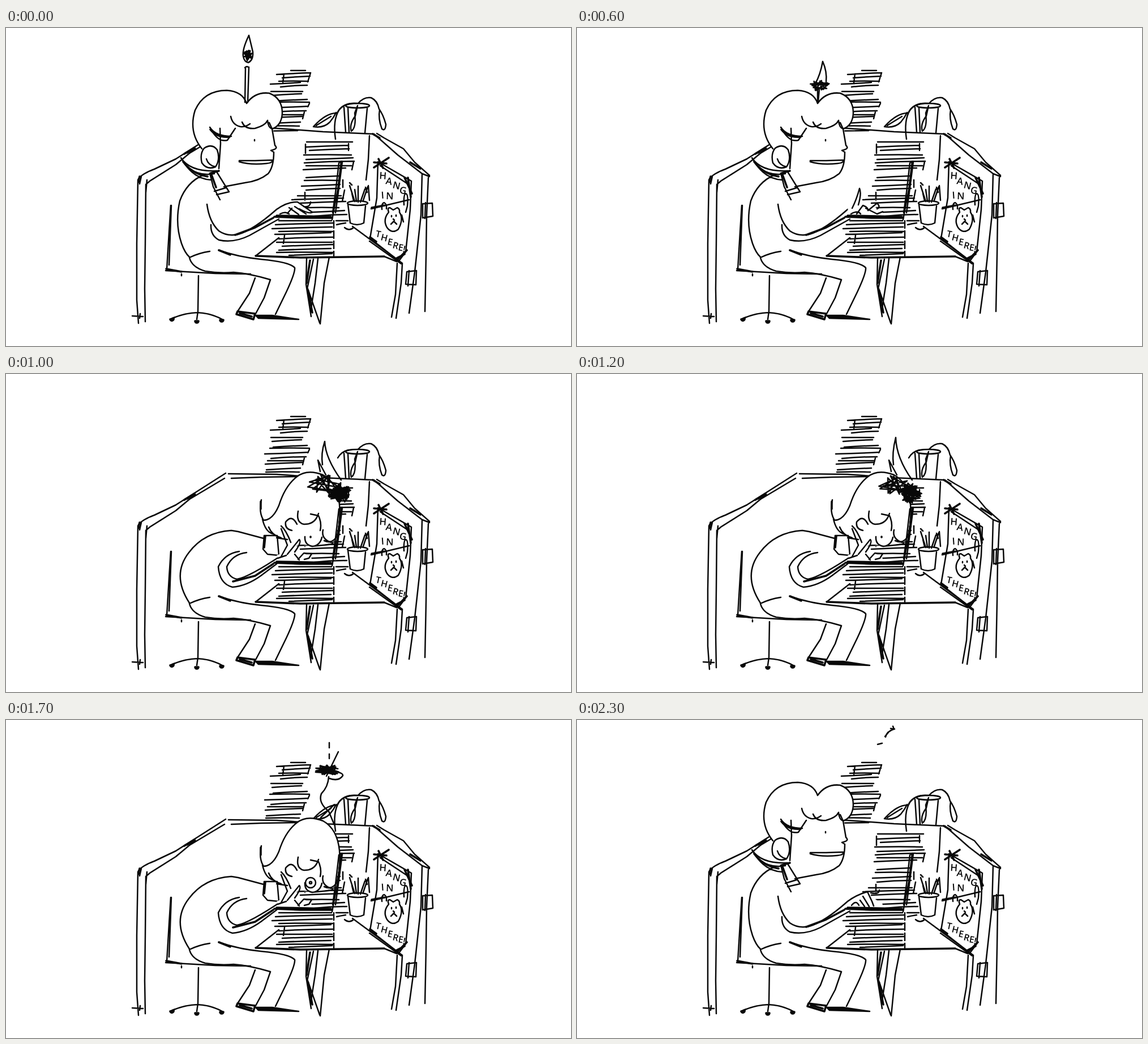
Animation of 998x561 px, one loop 2.4 s. Source, as an HTML page:

```html
<!DOCTYPE html>
<html lang="en">
<head>
<meta charset="utf-8">
<title>Burnout at the desk</title>
<style>
html, body { margin: 0; width: 100%; height: 100%; overflow: hidden; background: #fff; }
svg { display: block; width: 100vw; height: 100vh; }
path, ellipse { fill: none; stroke: #080808; stroke-width: 2.5; stroke-linecap: round; stroke-linejoin: round; }
.bold { stroke-width: 3.6; }
.ink { fill: #080808; }
.cover { fill: #fff; stroke: none; }
text { font-family: "Open Sans", "Noto Sans", sans-serif; font-weight: 600; fill: #080808; }
</style>
</head>
<body>
<svg viewBox="0 0 998 561" preserveAspectRatio="none">
  <!-- cubicle walls -->
  <path d="M234 521L231 480 231 380 233 268Q236 259 262 249L300 231 333 210 388 175M246 518L245 460 246 380 247 276 254 270 300 241 324 221 386 184M239 262L236 275M249 268L247 290M223 508L242 509M237 504L236 512"/>
  <path class="bold" d="M315 222L333 211M320 220L334 213M236 262L234 272"/>
  <path d="M393 176L478 177 520 180 560 183 650 187M398 184L450 182 515 181M650 187L692 224 735 257M655 186L668 194 702 213 722 237 748 260M748 262L735 257 733 330 722 430 712 503M746 264L743 330 742 400 740 500M642 190L640 232 636 268"/>
  <path class="bold" d="M648 187L660 194M714 237L732 248"/>
  <path d="M736 310L753 309 754 332 736 335ZM741 308L740 336M708 430L725 428 724 453 706 452ZM712 428L710 455"/>

  <!-- paper piles -->
  <path id="topPile"/>
  <path id="midPile"/>

  <!-- plant -->
  <path id="stem" d="M620 133Q599 131 588 145Q577 163 582 196M584 150Q565 150 543 174Q561 177 572 166Q579 158 583 149M548 172L574 156"/>
  <path d="M597 140L600 184M604 141L606 184M638 142L634 185M621 137L617 155Q606 170 610 182Q619 176 616 150L621 137M622 133Q632 121 645 123Q656 128 659 143Q666 152 671 170Q670 183 664 178Q657 160 660 144M586 148Q592 137 605 134"/>
  <ellipse cx="621" cy="137" rx="21" ry="4"/>

  <!-- poster -->
  <path d="M657 236L655 300 643 371 694 411 706 395 714 320 716 270 657 236M661 243L711 276M642 376L698 416M645 319L712 303"/>
  <path class="bold" d="M650 246L676 229M658 231L666 247M650 237L672 239M704 264L717 292M710 264L715 298M643 369L654 377M691 409L708 392M690 406L704 399M646 317L668 313"/>
  <path d="M664 320Q663 309 668 308Q673 311 672 319M703 312Q702 294 706 292Q711 293 709 314L706 325M676 325Q673 317 678 317L684 321 691 317Q696 319 695 325Q703 337 693 355Q682 364 673 352Q665 338 676 325M681 331V333M689 330V332M684 337L686 339M680 346L685 341 690 346M699 330L702 342"/>
  <text font-size="17" x="659 670 682 694" y="266 275 282 291" rotate="4 10 14 12">HANG</text>
  <text font-size="17" x="663 671" y="301 302" rotate="-4 2">IN</text>
  <text font-size="16" x="652 661 673 682 692 700" y="368 374 382 388 392 395" rotate="12 14 12 14 10 12">THERE!</text>

  <!-- pen pot -->
  <path class="cover" d="M604 311L608 345Q620 350 633 343L637 311Z"/>
  <path d="M604 311L608 344Q620 350 632 344L635 314M616 306L607 278M619 306L616 285M622 307L622 279M626 307L634 284M614 305L611 292M631 304L639 280M640 278L642 304M635 281L638 290M598 352Q606 359 614 352"/>
  <ellipse cx="621" cy="309" rx="18" ry="4"/>

  <!-- desk -->
  <path d="M441 402L482 370M612 350L650 378 700 415M531 406L530 452 539 509M543 408L532 460 537 480M551 407L546 450 538 500M571 404L562 450 555 522M533 460L554 520M691 415L688 470 681 510M700 416L698 450 689 512M668 403L690 412"/>
  <path class="bold" d="M441 402L520 405 600 404 668 403M534 464L541 502M537 410L531 450"/>
  <path id="lowPile"/>
  <path stroke-dasharray="13 5" d="M579 340V402"/>

  <!-- chair and legs -->
  <path d="M291 313L288 360 284 426M292 313L288 418M282 428L370 433 432 434M310 434V437M340 437L339 500 337 514M294 512Q315 503 338 502Q362 503 382 514"/>
  <path class="bold" d="M290 514A3 3 0 1 0 296 512ZM334 517A3 3 0 1 0 340 517ZM378 515A3 3 0 1 0 384 515ZM283 425L310 430"/>
  <path d="M324 405Q340 397 360 394M324 405Q328 422 352 429Q376 433 402 431Q430 433 467 444M376 392Q410 404 450 408Q502 413 510 423Q511 432 495 466L476 505M440 441L430 468 409 500M467 444L456 476 441 504"/>
  <path class="bold" d="M409 500L440 504 437 514 407 505ZM413 503L434 509M376 392L396 400"/>
  <path class="ink" d="M441 507L470 507 517 514 446 512Z"/>

  <!-- worker, laptop, fire -->
  <path id="cover" class="cover"/>
  <path id="body"/>
  <path id="accent" class="bold"/>
  <path id="lid"/>
  <path class="bold" d="M474 333L520 335 576 335M478 331L574 333"/>
  <path id="handCover" class="cover"/>
  <path id="hand"/>
  <g id="fire"><path id="flame"/><path id="char"/></g>
</svg>
<script>
const $ = id => document.getElementById(id);
const setPath = (id, d = '') => $(id).setAttribute('d', d);

// Each row is "left, y, right", drawn with a slight bow and tilt.
const rows = text => text.split(',').map((row, i) => {
  const [l, y, r] = row.trim().split(' ').map(Number);
  return `M${l} ${y + i % 3}Q${(l + r) / 2} ${y - i % 2} ${r} ${y - (i * 2) % 3}`;
}).join('');

function scribble(cx, cy, rx, ry, turns, seed) {
  let d = '';
  for (let i = 0; i <= turns; i++) {
    seed = (seed * 16807) % 2147483647;
    const a = i * 2.5 + seed % 100 / 90, k = 0.65 + seed % 37 / 100;
    d += `${i ? 'L' : 'M'}${(cx + Math.cos(a) * rx * k).toFixed(1)} ${(cy + Math.sin(a) * ry * k).toFixed(1)}`;
  }
  return d;
}

setPath('topPile', rows('503 75 529,478 81 538,488 86 537,482 94 534,467 98 520,485 102 532,468 112 524,470 118 522,472 127 532,466 131 536,457 140 534,468 147 530,462 153 524,458 158 523,460 167 520,459 173 518')
  + 'M538 79L533 95M491 81L489 96M536 133L533 139M527 148L524 160');
setPath('midPile', rows('531 201 612,530 209 604,536 214 606,526 224 610,530 231 613,527 236 615,530 243 610,525 249 600,530 262 588,527 269 590,522 278 590,530 284 590,515 296 592,505 302 596,520 307 600,528 317 588,540 324 598,545 330 602,583 340 604,584 346 600')
  + 'M529 205V221M605 204V216M614 236L611 250M528 290V304M595 268V281M598 286L594 306M607 273L611 277');
setPath('lowPile', rows('482 340 575,476 346 578,470 352 576,482 359 578,475 363 574,482 370 577,478 378 576,488 384 578,482 390 574,478 396 578,500 400 576')
  + 'M492 366L490 380');

const seatedBack = 'M349 259Q319 272 307 305Q298 345 310 380Q316 397 324 404';
const seatedArm = 'M355 311Q359 342 376 358Q390 368 410 364Q436 357 478 320M362 347Q361 366 376 374Q402 380 430 366L482 337';
const bentBack = 'M324 404Q292 355 323 315Q350 279 398 276L410 278 455 290';
const bentArm = 'M412 313Q386 317 375 340Q377 370 400 376Q425 374 450 356L478 335M425 315Q400 318 390 340Q391 358 408 362Q430 358 488 319';
const screen = 'M592 235L586 285 576 338M588 238L582 290 577 326M594 236L588 282 582 326M588 238L594 235';

const poses = {
  upright: {
    cover: 'M346 213Q322 180 334 145Q350 110 390 110Q418 112 425 133Q440 112 465 115Q488 124 488 150Q486 170 472 178L475 208 474 240Q468 265 425 274L380 285 349 259Z',
    body: seatedBack + seatedArm
      + 'M346 213Q322 183 334 145Q350 110 390 110Q418 112 425 133Q440 112 465 115Q488 124 488 150Q487 172 470 178Q463 176 462 163'
      + 'M397 156Q400 171 414 174Q423 175 431 169M417 166Q422 179 440 177Q458 172 462 163M465 167L470 178 475 207Q482 213 468 216L473 219Q473 245 463 257Q447 270 422 273L385 280'
      + 'M412 234L440 234 470 233Q472 238 460 239Q432 242 412 236ZM439 197V199'
      + 'M370 245Q355 251 346 238Q342 222 350 212Q364 203 373 215Q379 232 370 245Q357 242 354 231M378 177L379 204 376 248M360 175Q370 191 398 191M362 178Q374 202 391 198L405 177'
      + 'M309 229Q325 254 372 252M311 232Q330 266 362 268M320 245Q340 262 368 257M360 256L366 280 378 303M371 252L394 289 372 294M368 288L388 282',
    accent: 'M361 179Q372 194 395 192M313 236Q328 257 356 262M362 256L371 281M405 365L440 352 472 335M362 256L376 252',
    lid: screen
  },
  bent: {
    cover: 'M450 222Q449 250 458 256Q472 254 482 232Q493 197 514 181Q532 167 560 178Q585 192 589 230Q590 265 580 295Q565 302 545 304L520 300 482 320 454 309 456 285 453 275Z',
    body: bentBack + bentArm
      + 'M451 222Q446 244 455 258Q471 258 482 232Q493 197 514 181Q532 167 560 178Q585 192 589 230Q591 260 585 285Q577 301 562 294'
      + 'M453 256Q458 278 471 282M464 270Q470 285 486 289M516 242Q512 262 526 265Q546 266 552 246M538 247L552 250Q558 263 555 276M560 275Q556 292 577 298'
      + 'M514 265Q505 247 494 261Q492 273 505 276M528 287Q527 302 542 304Q555 302 558 288M540 304L580 300M456 285L479 285 482 320 462 318 454 309ZM478 289L497 292',
    accent: 'M401 366L440 356 472 335M450 225L450 238M458 286L456 306',
    lid: screen
  },
  shut: {
    cover: 'M478 306Q455 290 440 265Q430 236 440 228Q460 232 482 265L498 268 578 337 476 332Z',
    body: 'M324 404Q298 352 322 305Q350 266 400 270Q424 276 433 283M405 315Q377 320 375 345Q379 372 400 376Q425 374 450 356L476 338M416 317Q390 328 391 348Q397 363 412 362L474 333'
      + 'M440 287Q456 303 478 306Q488 300 493 281M440 265Q430 236 438 228Q460 230 482 265L497 282M428 250Q430 286 463 293Q447 282 432 252ZM500 296L506 298M505 302L512 301M522 314L542 302',
    accent: 'M403 366L440 356 472 335M430 254Q434 276 452 288',
    lid: 'M498 266L583 336M494 270L576 339M498 266L494 270M503 276L572 333'
  },
  back: {
    cover: 'M348 197Q353 175 344 150Q340 103 380 92Q425 85 450 115Q458 125 459 138Q500 138 522 160Q518 180 490 186L489 226 478 230Q474 250 460 262Q440 276 400 274L367 252 383 245Z',
    body: seatedBack + seatedArm
      + 'M302 153Q314 186 334 203Q350 198 350 176Q338 150 346 126Q358 93 396 91Q438 92 454 120Q460 130 459 137M464 138Q500 138 522 160Q522 184 480 187Q459 186 455 172Q432 185 405 177Q399 173 407 167M400 178Q388 182 390 171'
      + 'M302 153Q298 162 306 175L327 207 349 235 379 245M305 165L333 210M395 190Q393 179 380 182Q365 189 366 203Q374 214 387 212M383 218L382 242 368 253'
      + 'M490 180Q493 205 489 226Q483 230 474 229Q476 248 458 263Q440 276 402 274L377 279M407 219L462 256Q456 263 439 252Q418 238 407 222ZM461 199V201M352 261L376 307 397 299 367 252M376 288L385 280',
    accent: 'M405 365L440 352 472 335M304 158L318 186M408 221L436 242',
    lid: screen
  }
};

const hands = {
  A: 'M478 320Q498 306 515 307L541 325Q536 329 518 319M500 317L517 329M510 315L530 328M497 327L505 318M484 328Q494 323 500 328M526 315Q537 317 538 307',
  B: 'M486 318Q494 302 499 283Q503 291 497 312M494 328L505 313Q514 316 514 322L530 309Q537 316 530 319M510 318L530 328 540 324M484 328Q496 321 501 328',
  C: 'M478 320Q494 308 513 303L521 320 524 328M505 311L516 329M485 327Q493 317 498 327M500 318L508 329M519 305Q534 308 534 300',
  D: 'M486 322L497 302 486 273M486 268Q495 276 503 297M497 318L518 292Q523 296 510 314M510 318L518 328M516 327L526 316 540 317 535 325 527 327M480 325L495 320'
};

const candle = top => `M423 ${top + 2}L422 131M429 ${top + 1}L427 131M422 ${top + 2}Q426 ${top - 2} 429 ${top + 2}`;
const wickFlame = y => ({
  flame: `M429 ${y}Q417 ${y + 25} 419 ${y + 37}Q421 ${y + 47} 428 ${y + 48}Q437 ${y + 44} 436 ${y + 29}Q432 ${y + 12} 429 ${y}` + candle(y + 55),
  char: scribble(427, y + 35, 8, 11, 14, y + 5)
});
const hairFlame = (tip, size) => ({
  flame: `M421 98Q430 82 434 ${tip}Q442 77 440 95M425 106V131M428 108L426 130`,
  char: scribble(429, 101, 18 * size, 11 * size, 14 * size, 71)
});
const bentFlame = (tip, seed) => ({
  flame: `M555 172L551 152 565 178M559 160Q556 140 563 ${tip}Q564 148 592 187`,
  char: scribble(560, 195, 29, 18, 15, seed) + scribble(589, 210, 20, 18, 40, seed + 9)
});
const shutSmoke = {
  flame: 'M482 215Q488 205 522 206L545 184Q551 174 545 162Q547 147 560 137Q568 126 565 112L569 99 566 91 572 82 567 73 571 63M568 62H575M513 198L530 192 532 199ZM523 200L548 181',
  char: scribble(487, 233, 20, 25, 11, 33) + 'M469 226L500 235M478 240L483 262 493 268'
};
const bentSmoke = {
  flame: 'M571 40V49M571 60V68M570 100Q569 118 557 130Q551 146 570 161L580 185M576 91Q595 92 595 98Q588 109 571 103M556 172L580 149',
  char: scribble(568, 88, 23, 10, 20, 12) + 'M587 56L566 99'
};
const backSmoke = {
  flame: 'M464 133Q481 121 510 124Q531 126 541 139L556 154Q563 144 556 127L565 112Q565 94 553 84L560 73M579 22Q569 32 580 43L570 54',
  char: scribble(570, 63, 14, 7, 13, 44) + 'M550 71L562 68'
};
const wisps = { flame: 'M531 43L539 41M545 30Q547 20 560 16L558 11M544 29L550 22', char: 'M554 15L561 16' };
const lift = (fire, dy) => ({ ...fire, dy });

// One entry per tenth of a second: pose, hand, fire.
const steps = [];
const add = (pose, hand, fire) => steps.push({ pose, hand, fire });
[...'ABCABC'].forEach((hand, i) => add('upright', hand, wickFlame(13 + i * 9)));
add('upright', 'B', hairFlame(59, 1));
add('upright', 'C', hairFlame(44, 1.3));
add('upright', 'A', hairFlame(28, 1.7));
add('bent', 'D', bentFlame(128, 51));
add('bent', 'D', bentFlame(119, 24));
add('bent', 'D', bentFlame(104, 93));
add('bent', 'D', bentFlame(112, 17));
add('shut', 'B', lift(shutSmoke, 6));
add('shut', 'B', shutSmoke);
add('shut', 'B', lift(shutSmoke, -6));
add('bent', 'D', lift(bentSmoke, 10));
add('bent', 'D', bentSmoke);
add('bent', 'D', lift(bentSmoke, -12));
add('back', 'A', backSmoke);
add('back', 'A', lift(backSmoke, -8));
add('back', 'A', lift(wisps, 22));
add('upright', 'B', lift(wisps, 11));
add('upright', 'C', wisps);

let shown = -1;
function draw() {
  const now = Math.floor(performance.now() % 2400 / 100);
  if (now !== shown) {
    shown = now;
    const { pose, hand, fire } = steps[now], p = poses[pose];
    for (const part of ['cover', 'body', 'accent', 'lid']) setPath(part, p[part]);
    if (pose === 'bent' && now > 15) setPath('body', p.body + 'M529 287A9 9 0 1 0 547 287A9 9 0 1 0 529 287M536 287A2 2 0 1 0 540 287A2 2 0 1 0 536 287');
    else if (pose === 'bent') setPath('accent', p.accent + 'M538 287V288');
    setPath('hand', hands[hand]);
    setPath('handCover', 'M478 320L512 306 540 325 538 329 482 329Z');
    setPath('flame', fire.flame);
    setPath('char', fire.char);
    $('fire').setAttribute('transform', `translate(0 ${fire.dy || 0})`);
    $('stem').style.display = pose === 'bent' && now < 16 ? 'none' : '';
  }
  requestAnimationFrame(draw);
}
draw();
</script>
</body>
</html>
```
